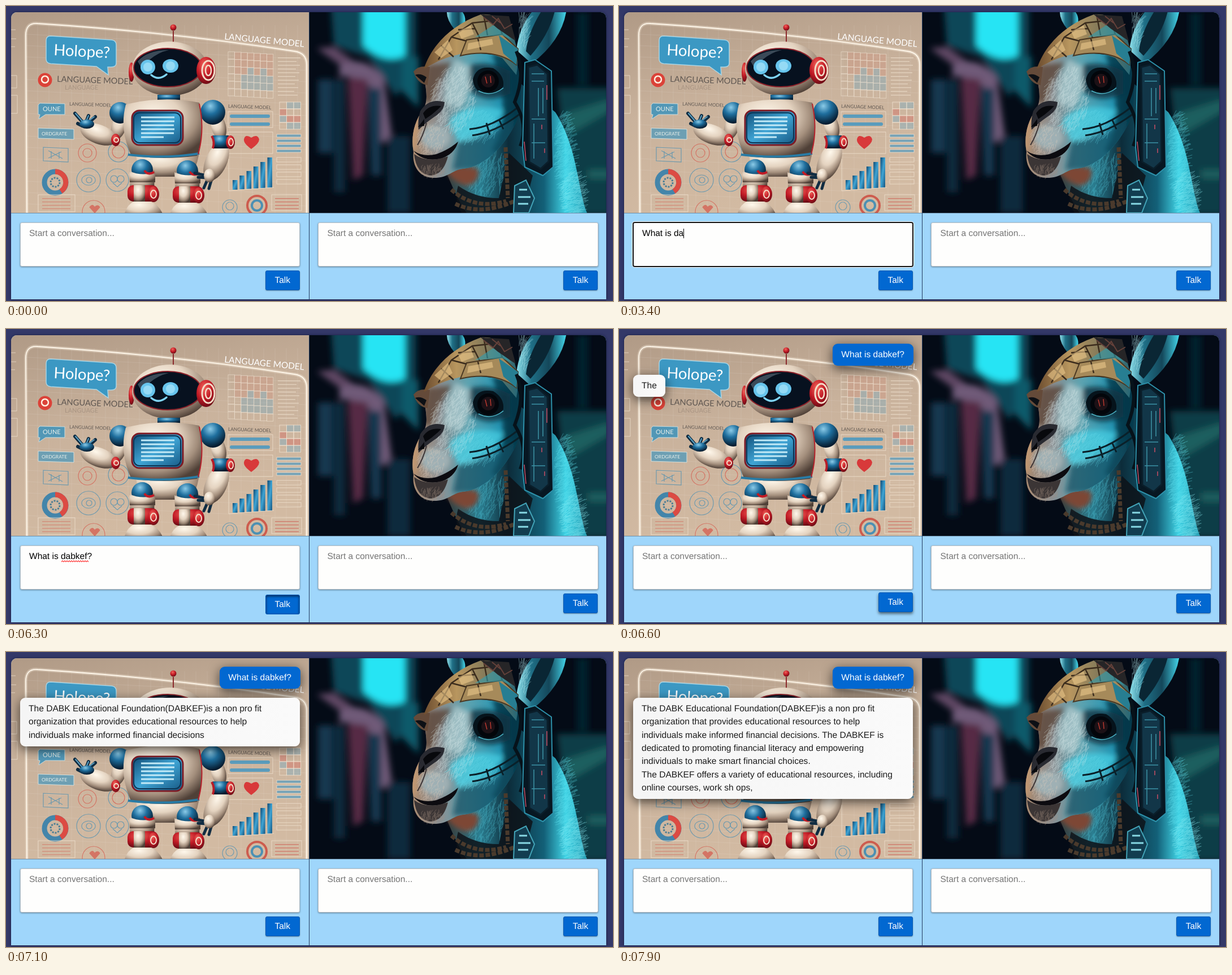
Animation, 1074 px wide and 522 px high, one loop 8 s. Source, as an HTML page:

```html
<!DOCTYPE html>
<html lang="en">
<head>
<meta charset="utf-8">
<title>Two chat panels</title>
<style>
html, body { margin: 0; width: 1074px; height: 522px; overflow: hidden; background: #333868; }
body { position: relative; font: 15.5px/23.4px "Liberation Sans", Arial, sans-serif; text-rendering: geometricPrecision; }
body div { position: absolute; box-sizing: border-box; white-space: pre; }
svg { position: absolute; left: 0; top: 0; }
#card { left: 9px; top: 11px; width: 1053px; height: 508px; border-radius: 10px 10px 0 0; overflow: hidden; background: #9fd6fb; box-shadow: 0 0 4px #181c42; }
#card svg { left: -9px; top: -11px; }
#chat { left: 0; top: 0; width: 527px; height: 355px; overflow: hidden; }
.field { top: 382.5px; width: 495.5px; height: 78px; padding: 7.5px 15.5px; background: #fefefd; border: 1px solid #b9bfc4; border-radius: 3px; box-shadow: 0 1px 3px #0006; color: #757575; }
.field.focus { border-color: #111; box-shadow: 0 0 0 1px #111, 0 0 0 2px #fff; }
.caret { display: inline-block; width: 1px; height: 17px; margin-right: -1px; vertical-align: -4px; background: #000; }
.talk { top: 468px; width: 61.5px; height: 35px; line-height: 33px; text-align: center; color: #fff; background: #0268d1; border: 1px solid #0459b4; border-radius: 3px; box-shadow: 0 1px 2px #0005; }
.talk.hover { top: 466px; box-shadow: 0 3px 5px #0008; }
.talk.press { top: 469.5px; box-shadow: inset 0 2px 4px #0009; }
.bubble { padding: 7.8px 15.5px; font-size: 15.58px; border-radius: 9px; box-shadow: 0 5px 20px #000a; }
#ask { right: 15.5px; top: 15px; color: #fff; background: #0268d1; }
#reply { left: 15.5px; top: 70px; color: #1c1c1c; background: linear-gradient(90deg, #f5f5f5, #fafafa); }
</style>
</head>
<body>
<div id="card">
<svg width="1074" height="522">
<defs>
  <radialGradient id="cream" cx=".38" cy=".28" r=".75"><stop offset="0" stop-color="#fff8ec"/><stop offset=".45" stop-color="#e4d3c0"/><stop offset=".75" stop-color="#a38e7c"/><stop offset="1" stop-color="#4f4037"/></radialGradient>
  <radialGradient id="blue" cx=".4" cy=".25" r=".8"><stop offset="0" stop-color="#8bcbe8"/><stop offset=".4" stop-color="#1f6f9e"/><stop offset=".9" stop-color="#061c30"/></radialGradient>
  <radialGradient id="red" cx=".4" cy=".3" r=".8"><stop offset="0" stop-color="#f4655c"/><stop offset=".5" stop-color="#c01a25"/><stop offset="1" stop-color="#560811"/></radialGradient>
  <linearGradient id="wall" x2=".3" y2="1"><stop offset="0" stop-color="#b09a86"/><stop offset=".5" stop-color="#c9b29c"/><stop offset="1" stop-color="#d2baa2"/></linearGradient>
  <linearGradient id="screen" x2="1" y2="1"><stop offset="0" stop-color="#0f4a74"/><stop offset=".5" stop-color="#3fa4d4"/><stop offset="1" stop-color="#155580"/></linearGradient>
  <linearGradient id="face"><stop offset="0" stop-color="#a98a70"/><stop offset=".25" stop-color="#8b8f92"/><stop offset=".5" stop-color="#5fa3b0"/><stop offset=".8" stop-color="#2595b2"/><stop offset="1" stop-color="#0a4257"/></linearGradient>
  <linearGradient id="neck"><stop offset="0" stop-color="#3a3430"/><stop offset=".25" stop-color="#2b7f92"/><stop offset=".45" stop-color="#0c2c3a"/><stop offset=".7" stop-color="#136078"/><stop offset=".85" stop-color="#3fd2e4"/><stop offset="1" stop-color="#2a9fb5"/></linearGradient>
  <linearGradient id="gold"><stop offset="0" stop-color="#6d4d2f"/><stop offset=".35" stop-color="#b8965f"/><stop offset=".7" stop-color="#7d7659"/><stop offset="1" stop-color="#256878"/></linearGradient>
  <linearGradient id="ear"><stop offset="0" stop-color="#8fe3ee"/><stop offset=".3" stop-color="#1f6f86"/><stop offset=".65" stop-color="#14475a"/><stop offset="1" stop-color="#45d9ee"/></linearGradient>
  <filter id="blur" x="-1" y="-1" width="3" height="3"><feGaussianBlur stdDeviation="6"/></filter>
  <filter id="soft" x="-1" y="-1" width="3" height="3"><feGaussianBlur stdDeviation="4"/></filter>
  <clipPath id="left"><path d="M9 11h527v355H9z"/></clipPath>
  <clipPath id="right"><path d="M536 11h527v355H536z"/></clipPath>
  <path id="head" d="M742 108C736 135 752 160 738 183C722 205 716 232 721 258C718 284 732 304 756 304C782 305 790 290 808 288C850 285 888 240 905 200C915 160 912 120 900 90L800 80Z"/>
  <clipPath id="inHead"><use href="#head"/></clipPath>
</defs>

<g clip-path="url(#left)">
  <path fill="url(#wall)" d="M9 11h527v355H9z"/>
  <path id="mesh" fill="none" stroke="#fff" opacity=".1"/>
  <path d="M37 366L35 54Q34 29 56 31Q300 47 510 80Q532 83 532 104V366" fill="none" stroke="#fff4e4" stroke-width="6" opacity=".3"/>
  <path d="M37 366L35 54Q34 29 56 31Q300 47 510 80Q532 83 532 104V366" fill="none" stroke="#fff7ea" stroke-width="1.8"/>
  <g fill="none" stroke="#f0e3d2" opacity=".7"><path d="M9 42h8M9 58h9M9 123h10v22H9M9 158h11v32H9M9 72h7"/></g>

  <path d="M79 53L187 60Q195 61 195 69V101Q195 108 186 108H180L181 122L160 107L79 102Q71 101 71 94V61Q71 53 79 53Z" fill="#3c98c3" stroke="#a9d5e5" stroke-width="1.5"/>
  <g font-family="Lato, sans-serif">
    <text x="84" y="87" font-size="27.5" fill="#fff" transform="rotate(3 84 87)">Holope?</text>
    <text x="90" y="134" font-size="14.6" fill="#5f5751" transform="rotate(2 90 134)">LANGUAGE MODEL</text>
    <text x="104" y="148" font-size="11" fill="#8d7b6d" opacity=".5">LANGUAGE</text>
    <text x="112" y="176" font-size="8.1" fill="#5f5751" transform="rotate(2 112 176)">LANGUAGE MODEL</text>
    <text x="386" y="59" font-size="15.4" fill="#fff" transform="rotate(5.5 386 59)">LANGUAGE MODEL</text>
    <text x="393" y="180" font-size="8.3" fill="#5f5751" transform="rotate(2 393 180)">LANGUAGE MODEL</text>
    <path d="M60 172L104 173V192H70L58 200L60 192H57V175Z" fill="#5297b6" stroke="#c9dcdd"/>
    <path d="M57 216L120 218V236L57 234Z" fill="#6d9fb3" stroke="#d5e0dc"/>
    <text x="65" y="186" font-size="11" fill="#e8eee9">OUNE</text>
    <text x="63" y="229" font-size="8.5" fill="#e8eee9">ORDGRATE</text>
  </g>
  <circle cx="69" cy="131" r="12.5" fill="#db4238"/><circle cx="69" cy="130" r="6" fill="none" stroke="#fff0e0" stroke-width="2.5"/>

  <g fill="none" stroke="#4c90b3" stroke-width="1.2" opacity=".75">
    <path d="M66 250L110 252V276L66 274ZM75 256L100 270M75 269L98 258M80 257v13M94 258v12"/>
    <circle cx="199" cy="258" r="18"/><circle cx="199" cy="258" r="11" stroke="#d55d50"/>
    <circle cx="146" cy="308" r="21"/><ellipse cx="146" cy="308" rx="12" ry="9"/><circle cx="147" cy="308" r="5"/>
    <circle cx="197" cy="308" r="20"/><circle cx="191" cy="306" r="6"/><circle cx="203" cy="306" r="6"/><path d="M189 313L197 320L205 313"/>
    <circle cx="396" cy="356" r="13"/><circle cx="396" cy="354" r="7"/>
    <g stroke="#d55d50"><circle cx="144" cy="260" r="16"/><circle cx="144" cy="260" r="8"/><circle cx="155" cy="364" r="20"/><path d="M148 356q5-7 9 0q5-6 9 0l-9 10z" fill="#d55d50"/></g>
  </g>
  <circle cx="87" cy="312" r="19" fill="none" stroke="#4385aa" stroke-width="9"/>
  <path d="M87 293A19 19 0 0 1 97 328" fill="none" stroke="#dc4b43" stroke-width="9"/>
  <circle cx="87" cy="312" r="8" fill="none" stroke="#4c7e94" stroke-width="3" stroke-dasharray="3 2"/>
  <circle cx="444" cy="353" r="17" fill="none" stroke="#cd5c4e" stroke-width="4"/><circle cx="444" cy="353" r="9" fill="none" stroke="#4c90b3" stroke-width="4"/>
  <g id="panel"></g>
  <path d="M434 253Q420 243 421 236Q423 226 434 233Q445 226 448 236Q448 243 434 253Z" fill="#d8393a"/>

  <path d="M296 44V68" stroke="#8c2a2c" stroke-width="2"/><circle cx="296" cy="38" r="5.5" fill="url(#red)"/>
  <ellipse cx="222" cy="117" rx="5" ry="17" fill="url(#red)"/>
  <ellipse cx="290" cy="111" rx="67" ry="48" fill="url(#cream)"/>
  <ellipse cx="286" cy="109" rx="60" ry="34" fill="#07111f" stroke="#8c2029" stroke-width="2"/>
  <path d="M233 98Q250 78 288 78Q260 84 240 110Z" fill="#9cb6c4" opacity=".35"/>
  <g fill="#67c4ec"><ellipse cx="251" cy="108" rx="13" ry="13"/><ellipse cx="291" cy="106" rx="14" ry="12"/></g>
  <g fill="#a9e4fa" opacity=".7"><circle cx="251" cy="108" r="8"/><circle cx="291" cy="106" r="8"/></g>
  <path d="M257 122Q270 133 284 121" fill="none" stroke="#7fd4f5" stroke-width="3.5" stroke-linecap="round"/>
  <ellipse cx="354" cy="114" rx="17" ry="24" fill="url(#red)"/>
  <g fill="none" stroke="#f3dcc8"><ellipse cx="358" cy="114" rx="11" ry="17" stroke-width="3"/><ellipse cx="358" cy="114" rx="5" ry="9" stroke-width="2.5"/></g>
  <path d="M268 157H308V167H268Z" fill="url(#blue)"/>

  <ellipse cx="200" cy="212" rx="13" ry="26" transform="rotate(18 200 212)" fill="url(#cream)"/>
  <circle cx="202" cy="189" r="19" fill="url(#blue)"/>
  <ellipse cx="164" cy="227" rx="34" ry="17" transform="rotate(20 164 227)" fill="url(#cream)"/>
  <ellipse cx="194" cy="237" rx="8" ry="11" fill="url(#red)"/><circle cx="195" cy="237" r="4" fill="none" stroke="#f3dcc8" stroke-width="2"/>
  <path d="M140 212L158 196M140 210L146 194M136 206L122 190M135 212L127 208" stroke="#102c42" stroke-width="6" stroke-linecap="round"/>
  <path d="M141 207L156 196M135 204L123 190M142 203L146 194" stroke="#5aa0c2" stroke-width="2" stroke-linecap="round"/>
  <ellipse cx="143" cy="209" rx="13" ry="8" fill="url(#blue)"/>

  <ellipse cx="376" cy="213" rx="13" ry="24" transform="rotate(-15 376 213)" fill="url(#cream)"/>
  <circle cx="366" cy="188" r="22" fill="url(#blue)"/>
  <ellipse cx="372" cy="275" rx="19" ry="36" transform="rotate(24 372 275)" fill="url(#cream)"/>
  <path d="M366 229H394V252H366Z" fill="url(#blue)"/><path d="M364 230Q370 240 366 252" fill="none" stroke="#b81d28" stroke-width="4"/>
  <ellipse cx="397" cy="241" rx="8" ry="12" fill="url(#red)"/><ellipse cx="398" cy="241" rx="4" ry="6.5" fill="none" stroke="#f3dcc8" stroke-width="2"/>

  <path d="M228 255H342Q338 300 312 302H264Q234 300 228 255Z" fill="url(#cream)"/>
  <path d="M212 174Q280 158 342 171Q354 218 338 265Q280 273 222 265Q200 220 212 174Z" fill="url(#cream)"/>
  <path d="M216 263Q280 271 342 261" fill="none" stroke="#287ba5" stroke-width="4"/>
  <path d="M342 173Q352 220 340 262" fill="none" stroke="#b6212b" stroke-width="2"/>
  <rect x="223" y="185" width="90" height="61" rx="13" fill="url(#screen)" stroke="#7e1b25" stroke-width="3"/>
  <rect x="226" y="189" width="83" height="53" rx="10" fill="none" stroke="#0b3554" stroke-width="2"/>
  <path d="M239 197h59M239 204h59M239 211h58M239 218h59M239 225h58M239 232h40" stroke="#c2e9f6" stroke-width="3"/>
  <g id="leg">
    <path d="M222 290Q240 275 263 292L262 328H218Z" fill="url(#cream)"/><circle cx="241" cy="290" r="19" fill="url(#blue)"/>
    <path d="M218 292Q240 302 264 294V312H219Z" fill="url(#cream)"/>
    <path d="M245 291Q250 300 262 294" fill="none" stroke="#c01a25" stroke-width="4"/>
    <path d="M208 376Q212 345 240 342Q272 345 280 376Z" fill="url(#cream)"/>
    <rect x="215" y="317" width="54" height="29" rx="10" fill="url(#red)"/><path d="M226 317H246V346H226Z" fill="url(#cream)"/>
    <ellipse cx="261" cy="333" rx="10" ry="14" fill="url(#red)"/><ellipse cx="261" cy="333" rx="5" ry="7" fill="none" stroke="#f3dcc8" stroke-width="2"/>
  </g>
  <use href="#leg" x="80" y="2"/>
  <path d="M356 300L334 296M356 304L340 303M357 306L350 322M364 306L359 323" stroke="#102c42" stroke-width="5" stroke-linecap="round"/>
  <ellipse cx="360" cy="300" rx="10" ry="12" fill="url(#cream)"/>
</g>

<g clip-path="url(#right)">
  <path fill="#040b16" d="M536 11h527v355H536z"/>
  <g filter="url(#blur)">
    <path d="M575 0H725V110L690 160L640 90L580 70Z" fill="#0c4759"/>
    <path d="M632 0H706V88Q670 105 632 70Z" fill="#27e4f4"/>
    <path d="M700 90H730V180L700 150Z" fill="#0f5a6b"/>
    <path d="M550 75L580 72L640 115L640 140Z" fill="#5f4763"/>
    <path d="M590 105Q630 85 668 125L684 240H664L652 150Q620 120 590 125Z" fill="#6f5a78"/>
    <path d="M605 125L640 130L632 300L614 308Z" fill="#562c45"/>
    <path d="M640 145H664V300H646ZM552 130H578V260H552Z" fill="#14384f"/>
    <path d="M580 130H600V330H580ZM675 230H715V366H675Z" fill="#0b2a3c"/>
    <path d="M975 145H1070V370H1000Z" fill="#0d3e46"/>
    <path d="M990 190L1070 165V185L1000 225ZM1030 290H1070V305H1030Z" fill="#1b5e5f"/>
    <path d="M1010 11H1030V140H1010Z" fill="#06222f"/>
  </g>

  <path d="M780 11H808Q818 25 806 45L794 42Q780 25 780 11Z" fill="url(#ear)"/>
  <path d="M903 78Q908 35 935 5H992Q985 60 930 102Z" fill="url(#ear)"/>
  <path d="M920 80Q924 45 950 5H972Q962 50 928 88Z" fill="#0a2634"/>
  <g class="fur" data-fur="914,48,8,30,-1.2,18,#bdf4f8,60"></g>
  <path d="M775 285C790 320 800 345 815 366H1028C1012 330 1012 250 972 188L890 120Z" fill="url(#neck)"/>
  <g class="fur" data-fur="985,265,17,75,-0.6,16,#63e5f2,330"></g>
  <g class="fur" data-fur="1000,335,22,40,-0.4,16,#8ff0f7,230"></g>
  <g class="fur" data-fur="850,288,40,40,1.9,18,#4fc2d5,240"></g>
  <path d="M800 318Q830 340 872 340L890 260L932 300L915 366H806Q792 345 800 318Z" fill="#0d1218" opacity=".85"/>
  <path d="M788 325Q830 362 885 345M795 350Q840 372 900 345M884 250L888 340" fill="none" stroke="#4a3a2c" stroke-width="7" stroke-dasharray="8 3"/>
  <path d="M778 290Q800 276 835 288Q840 312 815 318Q790 312 778 290Z" fill="#7d4636" filter="url(#soft)"/>

  <use href="#head" fill="url(#face)"/>
  <g clip-path="url(#inHead)">
    <g filter="url(#soft)">
      <path d="M795 95Q780 130 775 165Q800 190 815 165L828 110Z" fill="#a9c6ca" opacity=".85"/>
      <path d="M745 105L790 100Q765 130 755 170H735Z" fill="#5a4537" opacity=".8"/>
      <path d="M860 85L910 85V260Q880 270 860 255Q900 190 860 85Z" fill="#062c3c" opacity=".75"/>
      <path d="M785 200Q825 165 880 185Q860 225 800 240Z" fill="#48cfe3" opacity=".75"/>
      <path d="M800 240Q860 235 900 195L890 290H790Z" fill="#0d4d61" opacity=".7"/>
      <ellipse cx="760" cy="232" rx="26" ry="22" fill="#9fb0b4"/>
      <path d="M716 190L738 185Q728 225 726 255H712Z" fill="#c79b74" opacity=".8"/>
      <path d="M820 105Q855 95 892 115V155Q850 175 820 150Z" fill="#0a3040" opacity=".8"/>
    </g>
  </g>
  <path d="M721 116Q730 104 750 108L746 140Q728 138 721 116Z" fill="#644a39"/><path d="M724 122Q733 118 744 126L740 136Z" fill="#0d1015"/>
  <g class="fur" data-fur="795,160,38,58,2.1,14,#dcecec,380"></g>
  <g class="fur" data-fur="830,210,45,28,2.3,14,#62d8e8,280"></g>
  <g class="fur" data-fur="752,235,24,28,2,8,#e0cdbd,140"></g>
  <path d="M733 186Q748 162 776 170Q776 185 758 196Q742 207 730 219Q728 202 733 186Z" fill="#292a31"/>
  <path d="M738 190Q748 174 770 177Q758 190 742 200ZM729 214L740 200V212Z" fill="#08090d"/>
  <path d="M744 207Q738 230 728 246" fill="none" stroke="#3c3435" stroke-width="2"/>
  <path d="M721 256Q738 268 762 262Q784 254 800 240Q794 262 770 270Q738 277 721 256Z" fill="#0c0b10"/>
  <path d="M722 262Q745 279 782 266Q774 298 752 300Q726 298 722 262Z" fill="#3b3535"/>
  <g class="fur" data-fur="754,288,22,11,1.9,9,#a58f80,80"></g>
  <path d="M826 130Q832 104 862 110Q882 122 880 142Q866 160 842 154Q828 148 826 130Z" fill="#06131b"/>
  <circle cx="853" cy="133" r="19" fill="#03060b"/><circle cx="853" cy="132" r="12" fill="#1c1116"/>
  <path d="M848 125L851 137M857 124L858 136" stroke="#b8382f" stroke-width="1.5"/>
  <path d="M836 150Q858 162 880 145" fill="none" stroke="#4fb8ca" stroke-width="1.5"/>
  <path d="M820 218Q860 215 905 180M825 229Q865 224 908 192M850 207L856 228M872 200L880 218" fill="none" stroke="#0a2029" stroke-width="3"/>

  <path d="M739 112C752 72 785 35 840 15C872 12 890 32 900 60Q909 92 903 122L878 92Q838 74 800 86Q765 94 739 112Z" fill="url(#gold)"/>
  <path d="M804 88L815 60L878 50L906 76L903 104Q866 74 804 88Z" fill="#a68a5a" stroke="#493722" stroke-width="2"/>
  <path d="M872 52L906 76L903 104L880 84Z" fill="#277e92"/>
  <path d="M765 95L788 55L825 30L870 25M788 55L815 62M825 30L838 56M770 70L792 90M870 25L878 50M845 15L852 52M800 42L830 40M835 58L840 78" fill="none" stroke="#3b2c1d" stroke-width="2.5"/>
  <path d="M758 82L782 60L790 78L770 92ZM800 45L822 34L828 50L806 58ZM818 66L860 58L862 68L816 78Z" fill="#ecc98b" opacity=".6"/>
  <path d="M830 55L868 30L895 60L878 52Z" fill="#2f9db0" opacity=".6"/>
  <path d="M840 15L890 18L902 62L870 40Z" fill="#262527"/>
  <path d="M845 20L862 33L871 22L882 40L896 32M860 18L875 30" stroke="#65413a" stroke-width="2" fill="none"/>
  <path d="M903 80Q920 120 900 170Q925 210 910 248" fill="none" stroke="#06121a" stroke-width="6"/>

  <path d="M918 100L936 95L965 115L968 285L950 300L918 285L914 250Z" fill="#071722" stroke="#2d91aa" stroke-width="2"/>
  <path d="M924 108L940 104L958 120L960 275L946 288L926 276Z" fill="#123648" stroke="#0a1e2a" stroke-width="3"/>
  <path d="M930 120H952M930 133H952M930 200H954M930 242H954M942 145V195M950 145V190M934 208V270" stroke="#3d93a6" stroke-width="1.5"/>
  <path d="M957 140V166M917 240L920 274M948 210V218M953 252V260" stroke="#c94e65" stroke-width="1.5"/>
  <path d="M900 318L920 308L935 340L925 366H898Z" fill="#123d50" stroke="#43a4b8" stroke-width="2"/><path d="M908 325H922M906 338H928M906 350H924" stroke="#87d9e4" stroke-width="3"/>
</g>
<path d="M9 366.5H1063" stroke="#6d8ea8"/>
<path d="M536.5 11V520" stroke="#243d60"/>
</svg>
<div id="chat"><div id="ask" class="bubble">What is dabkef?</div><div id="reply" class="bubble"></div></div>
</div>
<div id="field" class="field" style="left:24.5px"></div>
<div class="field" style="left:552px">Start a conversation...</div>
<div id="talk" class="talk" style="left:458.5px">Talk</div>
<div class="talk" style="left:985.8px">Talk</div>
<svg width="1074" height="522"><path id="squiggle" fill="none" stroke="#f33" stroke-width="1.1"/></svg>

<script>
const $ = id => document.getElementById(id);
let seed = 7;
const rnd = () => (seed = seed * 16807 % 2147483647) / 2147483647;

// Short hairs scattered inside an ellipse
for (const g of document.querySelectorAll('.fur')) {
  const [cx, cy, rx, ry, angle, len, color, n] = g.dataset.fur.split(',').map(v => v[0] === '#' ? v : +v);
  let d = '';
  for (let i = 0; i < n; i++) {
    const a = rnd() * 2 * Math.PI, r = Math.sqrt(rnd());
    const dir = angle + rnd() - .5, l = len * (.4 + rnd() * .6);
    d += `M${cx + rx * r * Math.cos(a)} ${cy + ry * r * Math.sin(a)}l${l * Math.cos(dir)} ${l * Math.sin(dir)}`;
  }
  g.innerHTML = `<path d="${d}" stroke="${color}" opacity=".4"/>`;
}

// Charts and lists on the board behind the robot
const rect = (x, y, w, h, fill, more = '') => `<rect x="${x}" y="${y}" width="${w}" height="${h}" fill="${fill}" ${more}/>`;
const edge = 'stroke="#efe1cf" stroke-opacity=".8"';
let board = '';
for (let r = 0; r < 6; r++) for (let c = 0; c < 7; c++) {
  const fill = r > 4 ? 'none' : r > 2 - c % 2 && c > 1 ? '#6ba7c4' : r < 3 && c > 0 ? '#cf8f7d' : 'none';
  board += rect(393 + c * 11.4, 81 + r * 13 + c * .7, 11.4, 13, fill, 'fill-opacity=".35" stroke="#eadccb" stroke-opacity=".7"');
}
for (let r = 0; r < 4; r++) for (let c = 0; c < 3; c++)
  board += rect(484 + c * 12.5, 170 + r * 12, 12.5, 12, ['none', '#74abc4', '#d1655a'][(r * 2 + c * c) % 3], 'fill-opacity=".4" ' + edge);
for (let i = 0; i < 6; i++) board += rect(401 + i * 12.3, 308 - i * 8, 8.5, 17 + i * 7.3, 'url(#screen)');
board += `<path d="M394 270V327L474 321" fill="none" ${edge}/>`;
for (let i = 0; i < 2; i++) board += rect(396, 192 + i * 14, 71, 6, '#5a9cbc', 'rx="3"');
board += rect(393, 187, 79, 28, 'none', edge) + rect(393, 223, 79, 38, 'none', edge);
for (let i = 0; i < 11; i++) board += rect(481, 91 + i * 6.6, 40 - i * 7 % 13, 1.3, '#efe1cf', 'opacity=".7"');
for (let i = 0; i < 4; i++) {
  board += rect(479, 227 + i * 9, 43, 5, '#75a2b6', edge) + rect(479, 268 + i * 13, 43, 8, 'none', edge);
  board += rect(476, 340 + i * 6, 42, 1.3, '#cf7768') + rect(64, 340 + i * 6, 50, 1.3, '#d28a77');
}
board += rect(470, 334, 53, 28, 'none', edge) + rect(57, 334, 65, 30, 'none', edge);
$('panel').innerHTML = board;

let mesh = '';
for (let i = 1; i < 25; i++) mesh += `M${36 + i * 20} 34V366` + (i < 17 ? `M36 ${30 + i * 20}L532 ${54 + i * 20}` : '');
$('mesh').setAttribute('d', mesh);
$('squiggle').setAttribute('d', 'M98 412' + 'l2 -2l2 2'.repeat(12));

const question = 'What is dabkef?';
const keyTimes = [1700, 1900, 2300, 2500, 2600, 2800, 2900, 3000, 3200, 3400, 3600, 3800, 4200, 4300, 4800];
const answer = ['The', ' DABK Educational Foundation', '(DABKEF)is a non', ' pro fit\norganization that',
  ' provides educational resources to help', '\nindividuals make informed financial decisions', '. The DABKEF',
  ' is\ndedicated to promoting', ' financial literacy and empowering', '\nindividuals to make', ' smart financial choices.',
  '\nThe DABKEF offers a variety of', ' educational resources, including\nonline courses, work sh ops,'];
const answerTimes = [6600, 6700, 6800, 6900, 7000, 7100, 7200, 7300, 7400, 7500, 7700, 7800, 7900];
const passed = (times, t) => times.filter(v => v <= t).length;
const within = (t, a, b) => t >= a && t < b;

function draw(t) {
  const focused = within(t, 600, 6300);
  const typed = t < 6500 ? question.slice(0, passed(keyTimes, t)) : '';
  const caret = focused && !within(t, 1100, 1600) && !within(t, 5300, 5800) ? '<span class="caret"></span>' : '';
  $('field').className = focused ? 'field focus' : 'field';
  $('field').style.color = typed ? '#000' : '';
  $('field').innerHTML = typed ? typed + caret : caret + 'Start a conversation...';
  $('squiggle').style.display = within(t, 5800, 6500) ? '' : 'none';

  $('talk').className = 'talk' + (within(t, 6300, 6500) ? ' press' : within(t, 6100, 7000) ? ' hover' : '');

  const reply = answer.slice(0, passed(answerTimes, t)).join('');
  $('ask').style.display = t >= 6500 ? '' : 'none';
  $('reply').style.display = reply ? '' : 'none';
  $('reply').style.width = reply.includes('\n') ? '495.5px' : '';
  $('reply').textContent = reply;
}

const start = performance.now();
function tick() {
  draw((performance.now() - start) % 8000);
  requestAnimationFrame(tick);
}
tick();
</script>
</body>
</html>
```
